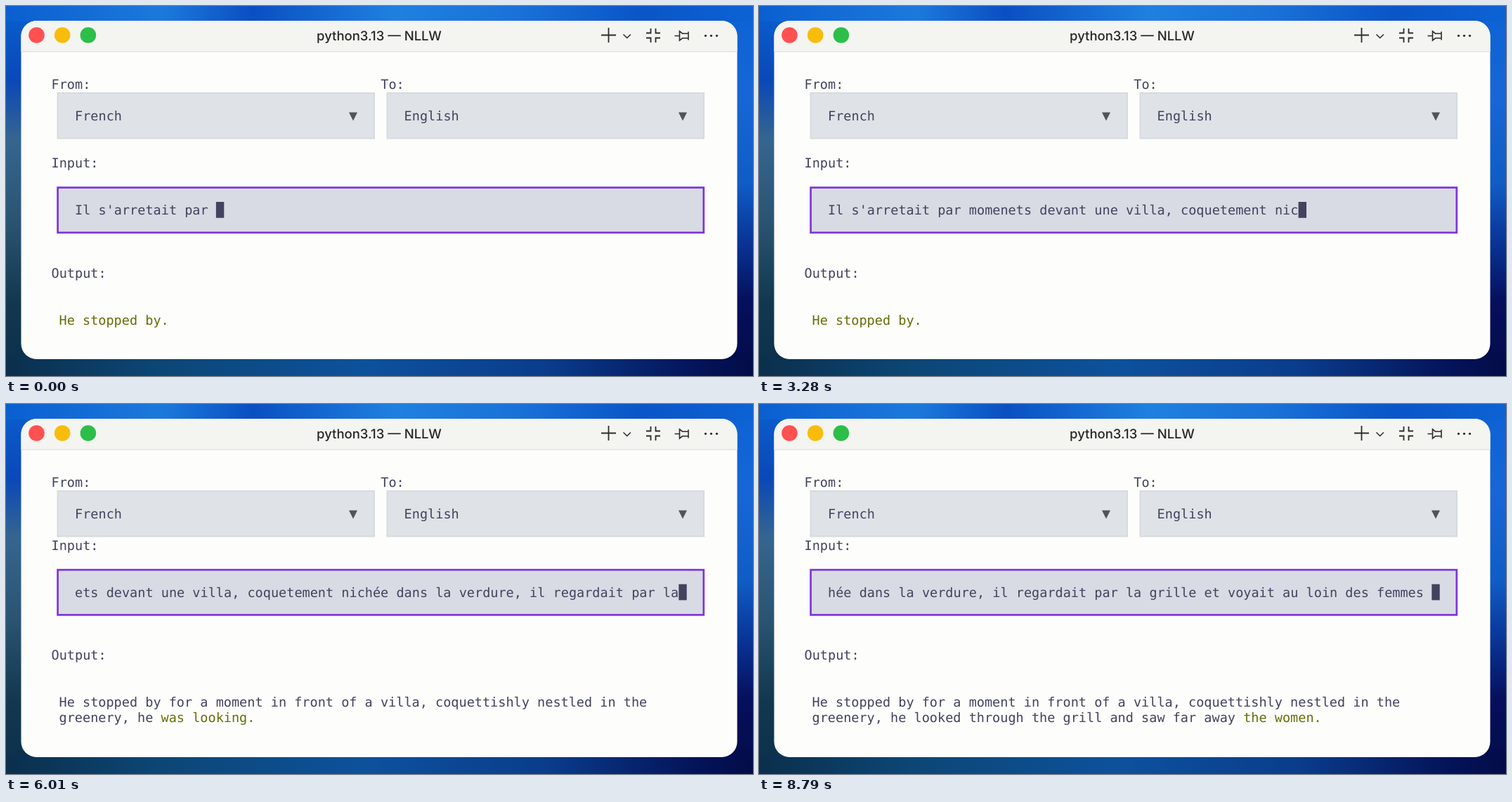
An HTML page that plays this animation: 1063x527 px, repeating every 8810 ms.

```html
<!DOCTYPE html>
<html lang="en">
<head>
<meta charset="utf-8">
<title>Live translation</title>
<style>
  html, body { margin: 0; width: 100%; height: 100%; overflow: hidden; }
  body {
    background:
      linear-gradient(90deg, #0a5fd0, #1c79dc 21%, #0a4fc2 33%, #1f80e0 52%, #1a72d8 68%, #0a55c8 85%, #0c62d4) 0 0 / 100% 22px no-repeat,
      linear-gradient(90deg, #0b2f4c, #0c4674 20%, #0d519c 48%, #0a3d8c 72%, #04145a 92%, #020c48) 0 100% / 100% 26px no-repeat,
      linear-gradient(#0a5fd0, #0a48b8 20%, #35658f 36%, #2b5472 58%, #12384f 80%, #0b2f4c) 0 0 / 50% 100% no-repeat,
      linear-gradient(#0c62d4, #1766d6 25%, #105cc4 48%, #0a389c 62%, #050f5c 80%, #020c48) 100% 0 / 50% 100% no-repeat;
  }
  svg { display: block; width: 100vw; height: 100vh; }
  text { white-space: pre; text-rendering: geometricPrecision; }
  .mono { font: 18.54px "DejaVu Sans Mono", monospace; fill: #42435f; }
  .title { font: 500 18.5px Inter, sans-serif; fill: #262626; text-anchor: middle; }
  .icon { fill: none; stroke: #2b2b2b; stroke-width: 1.8; }
  .select { fill: #dfe3e7; stroke: #d5dbe0; stroke-width: 2; }
  .field { fill: #d8dbe3; stroke: #7f35d9; stroke-width: 2.7; }
  .arrow { fill: #505557; }
  .draft { fill: #666d08; }
</style>
</head>
<body>
<svg viewBox="0 0 1063 527" preserveAspectRatio="none">
  <rect x="21.5" y="21" width="1019" height="482" rx="22" fill="#fdfdfb"/>
  <path d="M21.5 65V43a22 22 0 0 1 22-22H1018.5a22 22 0 0 1 22 22V65z" fill="#f4f4f1"/>
  <path d="M21.5 65H1040.5" stroke="#d9d9d7"/>
  <circle cx="43.5" cy="41.5" r="11.3" fill="#ff5052"/>
  <circle cx="80.2" cy="41.5" r="11.3" fill="#f8bc0b"/>
  <circle cx="116.9" cy="41.5" r="11.3" fill="#2bbf49"/>
  <text class="title" x="531" y="49.3">python3.13 — NLLW</text>

  <g class="icon">
    <path d="M847 41.5h21M857.5 31v21"/>
    <path d="M878.5 40.5l5.2 5 5.2-5" stroke-width="1.5"/>
    <path d="M911 38.5h6.5V32M924.5 32v6.5h6.5M911 45.5h6.5V52M924.5 52v-6.5h6.5"/>
    <path d="M951.5 42.5h7M958.5 36v13l4-3.2h8.5v-6.6h-8.5zM971 36.5v12" stroke-width="1.6"/>
  </g>
  <g fill="#2b2b2b">
    <circle cx="995.5" cy="42.3" r="1.6"/><circle cx="1003.5" cy="42.3" r="1.6"/><circle cx="1011.5" cy="42.3" r="1.6"/>
  </g>

  <g class="mono">
    <text x="64.5" y="118">From:</text>
    <text x="533.3" y="118">To:</text>
    <rect class="select" x="73.5" y="124" width="450.5" height="64.5"/>
    <rect class="select" x="542.5" y="124" width="450.5" height="64.5"/>
    <text x="98" y="162.7">French</text>
    <text x="566.6" y="162.7">English</text>
    <path class="arrow" d="M488 151.5h12l-6 12zM957 151.5h12l-6 12z"/>
    <g id="panel">
      <text x="64.5" y="230">Input:</text>
      <rect class="field" x="73.6" y="258.6" width="919.2" height="64.2"/>
      <text id="input" x="98" y="297"></text>
      <rect id="cursor" y="279" width="11.4" height="22.8"/>
      <text x="64.5" y="386.7">Output:</text>
      <text id="line1" x="75.5" y="453.5"></text>
      <text id="line2" x="75.5" y="475.9"></text>
    </g>
  </g>
</svg>
<script>
const LOOP = 8810, CELL = 11.16, ROW = 22.4, COLS = 77;
const sentence = "Il s'arretait par momenets devant une villa, coquetement nichée " +
  "dans la verdure, il regardait par la grille et voyait au loin des femmes ";

// [ms, characters typed]; typing runs evenly between two entries
const typing = [
  [0, 18], [150, 19], [300, 20], [1120, 35], [1220, 36], [1900, 47], [2100, 50], [2180, 51],
  [2360, 52], [2500, 53], [2680, 54], [2780, 55], [2930, 56], [3280, 60], [3800, 71], [3850, 72],
  [4450, 84], [4670, 87], [4740, 88], [4890, 90], [5090, 91], [5910, 99], [6010, 100], [6540, 109],
  [6740, 110], [7120, 118], [7600, 124], [7640, 125], [8350, 130], [8500, 131], [8790, 137], [LOOP, 137]
];

// [ms, settled text, draft text]; a line break starts the second row
const opening = "He stopped by for a moment in front of a villa, ";
const nestled = opening + "coquettishly nestled in the\ngreenery, he ";
const outputs = [
  [0, "", "He stopped by."],
  [3850, opening, "coqueted."],
  [5090, nestled, "was looking."],
  [6740, nestled + "looked through the ", "grill."],
  [8700, nestled + "looked through the grill and saw far away ", "the women."]
];

const el = id => document.getElementById(id);
const [panel, input, cursor, line1, line2] = ["panel", "input", "cursor", "line1", "line2"].map(el);

function typedAt(t) {
  const i = typing.findLastIndex(k => k[0] <= t);
  const [t0, n0] = typing[i], [t1, n1] = typing[i + 1];
  return Math.floor(n0 + (n1 - n0) * (t - t0) / (t1 - t0));
}

function setLine(line, settled, draft = "") {
  line.innerHTML = `${settled}<tspan class="draft">${draft}</tspan>`;
}

function draw(now) {
  const t = now % LOOP;
  const n = typedAt(t), skip = Math.max(0, n - COLS);
  input.textContent = sentence.slice(skip, n);
  cursor.setAttribute("x", 98 + (n - skip) * CELL);

  const [, settled, draft] = outputs.findLast(o => o[0] <= t);
  const [first, second] = settled.split("\n");
  const wrapped = second !== undefined;
  setLine(line1, first, wrapped ? "" : draft);
  setLine(line2, wrapped ? second : "", wrapped ? draft : "");
  panel.setAttribute("transform", `translate(0 ${wrapped ? -ROW : 0})`);
}

const start = performance.now();
function tick() {
  draw(performance.now() - start);
  requestAnimationFrame(tick);
}
tick();
</script>
</body>
</html>
```
